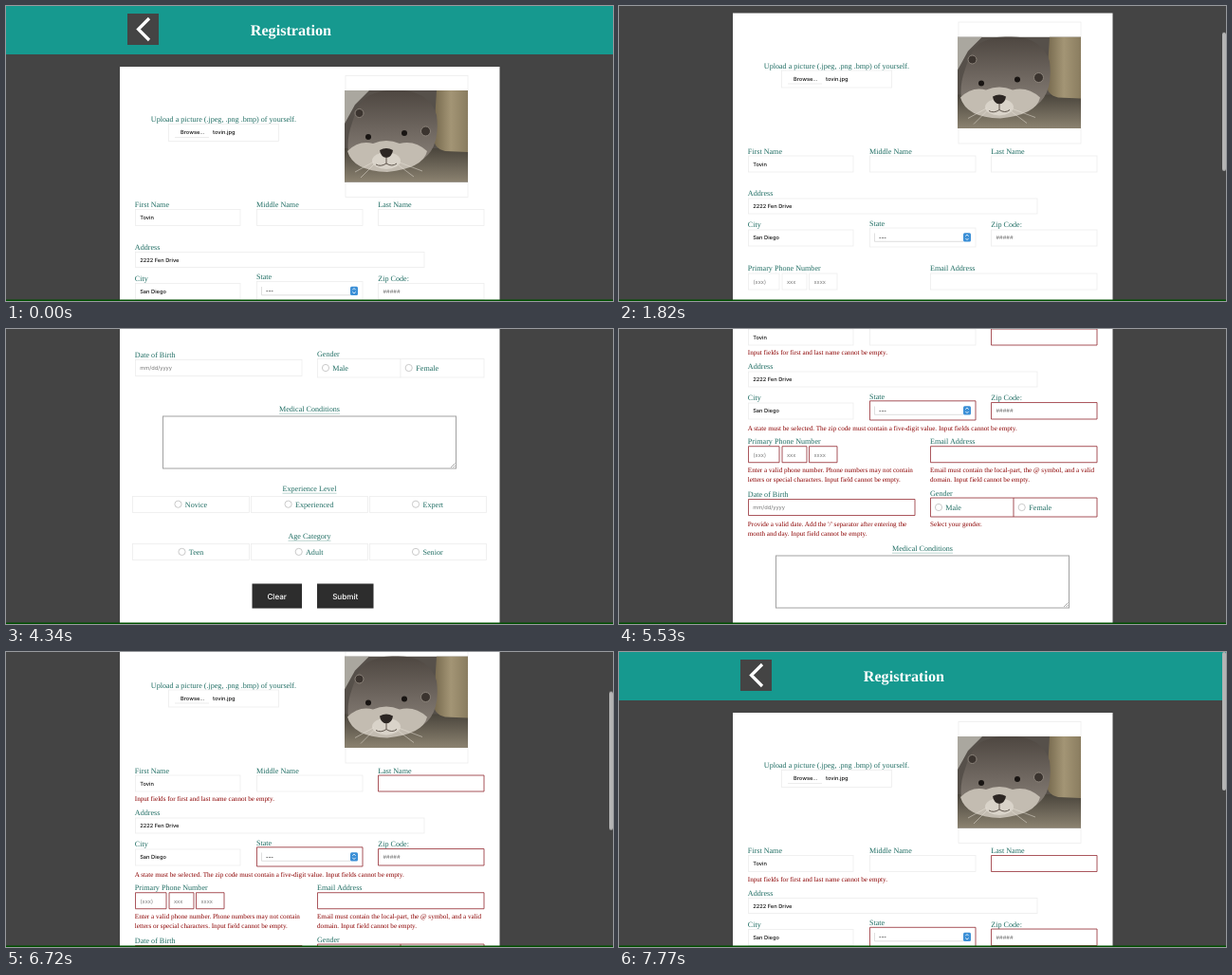
Recreate the animation shown at these times as an HTML page. Size 640 by 311 pixels, loop 7.91 s.

```html
<!DOCTYPE html>
<html lang="en">
<head>
<meta charset="utf-8">
<title>Registration form</title>
<style>
@property --scroll { syntax: "<number>"; inherits: true; initial-value: 0; }

html, body { margin: 0; width: 100%; height: 100%; overflow: hidden; background: #444; }

.stage {
  position: relative; width: 640px; height: 311px; overflow: hidden; background: #444;
  animation: scroll 7.91s infinite;
}
.page {
  position: absolute; left: 0; top: 0;
  transform: translateY(calc(var(--scroll) * -1px));
}
.thumb {
  position: absolute; left: 636px; top: 0; width: 3.5px; height: 145.5px;
  border-radius: 2px; background: #b4b4b4;
  transform: translateY(calc(var(--scroll) * .493px));
  animation: thumb 7.91s linear infinite;
}
.edge {
  position: absolute; left: 0; top: 310px; width: 640px; height: 1px;
  background: #005000; box-shadow: 0 -1px rgba(0, 80, 0, .5);
}

text { text-rendering: geometricPrecision; }
.title { font: bold 16.2px "Liberation Serif", Times, serif; fill: #fff; }
.label { font: 8.1px "Liberation Serif", Times, serif; fill: #1f6d63; }
.value, .hint { font: 500 5.7px Inter, "Liberation Sans", sans-serif; fill: #111; }
.hint { font-weight: 400; fill: #777; }
.button { font: 500 8.1px Inter, "Liberation Sans", sans-serif; fill: #fff; }
.mid { text-anchor: middle; }
.field { fill: #fff; stroke: #ededed; stroke-width: .8; }
.radio { fill: #fff; stroke: #bdbdbd; stroke-width: .8; }
.rule { stroke: #9fc2bc; stroke-width: .7; }

.errors { font: 7.14px "Liberation Serif", Times, serif; fill: #8b0000; animation: errors 7.91s step-end infinite; }
.errors path { fill: none; stroke: #9a3038; stroke-width: .8; }

/* Steps of 70 ms, as in a screen recording */
@keyframes scroll {
  0%      { --scroll: 0;     animation-timing-function: step-end; }
  19.469% { --scroll: 0;     animation-timing-function: steps(2); }
  21.239% { --scroll: 16;    animation-timing-function: steps(2); }
  23.009% { --scroll: 56.5;  animation-timing-function: steps(2); }
  24.779% { --scroll: 140;   animation-timing-function: steps(2); }
  26.549% { --scroll: 255;   animation-timing-function: steps(2); }
  28.319% { --scroll: 335;   animation-timing-function: steps(2); }
  30.088% { --scroll: 361.5; animation-timing-function: step-end; }
  60.177% { --scroll: 214.5; animation-timing-function: step-end; }
  78.761% { --scroll: 214.5; animation-timing-function: steps(2); }
  80.531% { --scroll: 195;   animation-timing-function: steps(5); }
  84.956% { --scroll: 84.5;  animation-timing-function: steps(3); }
  87.611% { --scroll: 25;    animation-timing-function: steps(2); }
  89.381%, 100% { --scroll: 0; }
}
@keyframes thumb {
  0%, 20.35% { opacity: 0; }
  20.354%, 39.8% { opacity: 1; }
  41.59%, 50.44% { opacity: 0; }
  50.445%, 52.2% { opacity: 1; }
  54.86%, 60.17% { opacity: 0; }
  60.177%, 67.2% { opacity: 1; }
  69.9%, 79.64% { opacity: 0; }
  79.646%, 100% { opacity: 1; }
}
@keyframes errors {
  0% { opacity: 0; }
  60.177%, 100% { opacity: 1; }
}
</style>
</head>
<body>
<div class="stage">
<svg class="page" width="640" height="740" viewBox="0 0 640 740">
  <defs>
    <linearGradient id="floor" x2="0" y2="1">
      <stop offset="0" stop-color="#4a453c"/><stop offset="1" stop-color="#8c8371"/>
    </linearGradient>
    <linearGradient id="fur" x2="0" y2="1">
      <stop offset="0" stop-color="#4d4640"/><stop offset=".5" stop-color="#6f6760"/>
      <stop offset="1" stop-color="#8f877e"/>
    </linearGradient>
    <linearGradient id="sack">
      <stop offset="0" stop-color="#75684d"/><stop offset=".5" stop-color="#a39575"/>
      <stop offset="1" stop-color="#8a7d60"/>
    </linearGradient>
    <clipPath id="crop"><rect x="357" y="89" width="130" height="96.5"/></clipPath>
  </defs>

  <rect width="640" height="51" fill="#16998f"/>
  <rect x="128" y="8" width="33" height="33" fill="#444"/>
  <path d="M151 13 139.5 24.5 151 36" fill="none" stroke="#fff" stroke-width="3.2"/>
  <text class="title" x="257.7" y="31">Registration</text>

  <rect x="120" y="64" width="400.5" height="680" fill="#fff"/>

  <!-- Picture upload -->
  <text class="label" x="152.8" y="122">Upload a picture (.jpeg, .png .bmp) of yourself.</text>
  <rect class="field" x="171.5" y="124.5" width="116" height="18"/>
  <path d="M178 138.5h36" stroke="#e4e4e4" stroke-width=".7"/>
  <text class="value" x="184" y="135.2">Browse...</text>
  <text class="value" x="218" y="135.2">tovin.jpg</text>
  <rect class="field" x="358" y="73.5" width="129" height="128"/>

  <g clip-path="url(#crop)">
    <rect x="357" y="89" width="130" height="97" fill="#56504a"/>
    <path d="M357 89h26l-15 15-11 20z" fill="#aaa79f"/>
    <path d="M357 150h130v36H357z" fill="url(#floor)"/>
    <path d="M454 89h33v65l-24-1q-13-3-12-16z" fill="url(#sack)"/>
    <path d="M380 96q20-11 46-6 22 5 28 25 3 24-6 38-12 17-45 21-34 0-42-19-2-16 4-32 5-18 15-27z" fill="url(#fur)"/>
    <path d="M360 153q12-12 27-8 14-6 28 0 16-4 29 8-4 18-42 22-36-1-42-22z" fill="#c3bcb1"/>
    <ellipse cx="401" cy="163" rx="15" ry="9" fill="#d9d3c9"/>
    <g fill="#3b342f" stroke="#8c847b">
      <circle cx="372.5" cy="113" r="4.5"/><circle cx="442.5" cy="132" r="5"/>
    </g>
    <path d="M394 152q7-4 14 0-1 7-7 8-6-1-7-8z" fill="#2c2623"/>
    <path d="M401 160v6q-6 4-11 1m11-1q6 4 11 0" fill="none" stroke="#5d534b"/>
    <g fill="#181412"><circle cx="382" cy="138" r="3"/><circle cx="420" cy="134" r="3"/></g>
    <path d="M388 164 368 175m20-8-14 14m41-16 24 9m-25-6 16 12" fill="none" stroke="#e8e2d8" stroke-width=".5"/>
  </g>

  <!-- Name and address -->
  <text class="label" x="135.8" y="212">First Name</text>
  <text class="label" x="264" y="212">Middle Name</text>
  <text class="label" x="392.3" y="212">Last Name</text>
  <rect class="field" x="136.5" y="214.5" width="110.5" height="17"/>
  <rect class="field" x="264.5" y="214.5" width="111.5" height="17"/>
  <rect class="field" x="392.5" y="214.5" width="111.5" height="17"/>
  <text class="value" x="141.2" y="225.2">Tovin</text>

  <text class="label" x="135.8" y="256.7">Address</text>
  <rect class="field" x="136.5" y="259.5" width="304.5" height="16"/>
  <text class="value" x="141.2" y="269.5">2222 Fen Drive</text>

  <text class="label" x="135.8" y="289.7">City</text>
  <text class="label" x="264" y="288">State</text>
  <text class="label" x="392.3" y="289.7">Zip Code:</text>
  <rect class="field" x="136.5" y="292.5" width="110.5" height="17"/>
  <rect class="field" x="264.5" y="290.5" width="111.5" height="20"/>
  <rect class="field" x="392.5" y="292.5" width="111.5" height="17"/>
  <text class="value" x="141.2" y="302.8">San Diego</text>
  <path d="M269.5 296v8.8H363" fill="none" stroke="#d2d2d2" stroke-width=".7"/>
  <rect x="363" y="295.7" width="8" height="9.3" rx="1.5" fill="#3b8fd6"/>
  <path d="M365.3 299.3 367 297.5l1.7 1.8m-3.4 2L367 303.1l1.7-1.8" fill="none" stroke="#fff" stroke-width=".8"/>
  <text class="value" x="274" y="302.3">---</text>
  <text class="hint" x="397.5" y="302.8">#####</text>

  <!-- Contact -->
  <text class="label" x="135.8" y="335.3">Primary Phone Number</text>
  <text class="label" x="328" y="335.3">Email Address</text>
  <rect class="field" x="136.5" y="338.5" width="32.5" height="17"/>
  <rect class="field" x="172" y="338.5" width="26" height="17"/>
  <rect class="field" x="200.5" y="338.5" width="29.5" height="17"/>
  <rect class="field" x="328.5" y="338.5" width="175.5" height="17"/>
  <text class="hint" x="141.5" y="349">(xxx)</text>
  <text class="hint" x="177" y="349">xxx</text>
  <text class="hint" x="205.5" y="349">xxxx</text>

  <text class="label" x="135.8" y="391.5">Date of Birth</text>
  <text class="label" x="328" y="390.3">Gender</text>
  <rect class="field" x="136.5" y="394" width="175.5" height="17"/>
  <rect class="field" x="328.5" y="393" width="87.5" height="19.5"/>
  <rect class="field" x="416" y="393" width="88" height="19.5"/>
  <text class="hint" x="141.2" y="404.6">mm/dd/yyyy</text>
  <circle class="radio" cx="337" cy="402.5" r="3.6"/><text class="label" x="344.3" y="405.2">Male</text>
  <circle class="radio" cx="424.7" cy="402.5" r="3.6"/><text class="label" x="432.3" y="405.2">Female</text>

  <!-- Medical -->
  <text class="label mid" x="320" y="448.3">Medical Conditions</text>
  <path class="rule" d="M288 450.7h64"/>
  <rect x="165.5" y="453.5" width="309" height="55" fill="#fff" stroke="#a2a2a2"/>
  <path d="M469 507.5l4.5-4.5m-2 4.5 2-2" stroke="#888" stroke-width=".7"/>

  <!-- Level and age -->
  <text class="label mid" x="320" y="532.3">Experience Level</text>
  <path class="rule" d="M291.5 534.7h57"/>
  <rect class="field" x="133.5" y="538" width="123" height="17"/>
  <rect class="field" x="258.5" y="538" width="123" height="17"/>
  <rect class="field" x="383.5" y="538" width="123" height="17"/>
  <circle class="radio" cx="181.5" cy="546.2" r="3.6"/><text class="label" x="188.8" y="549">Novice</text>
  <circle class="radio" cx="297.6" cy="546.2" r="3.6"/><text class="label" x="305" y="549">Experienced</text>
  <circle class="radio" cx="432" cy="546.2" r="3.6"/><text class="label" x="439.5" y="549">Expert</text>

  <text class="label mid" x="320" y="582.3">Age Category</text>
  <path class="rule" d="M297.5 584.7h45"/>
  <rect class="field" x="133.5" y="588" width="123" height="17"/>
  <rect class="field" x="258.5" y="588" width="123" height="17"/>
  <rect class="field" x="383.5" y="588" width="123" height="17"/>
  <circle class="radio" cx="185.5" cy="596.4" r="3.6"/><text class="label" x="192.8" y="599.2">Teen</text>
  <circle class="radio" cx="308.7" cy="596.4" r="3.6"/><text class="label" x="316" y="599.2">Adult</text>
  <circle class="radio" cx="432" cy="596.4" r="3.6"/><text class="label" x="439.5" y="599.2">Senior</text>

  <rect x="259.5" y="630" width="52.5" height="26" fill="#2d2d2d"/>
  <rect x="328" y="630" width="59.5" height="26" fill="#2d2d2d"/>
  <text class="button mid" x="285.7" y="646">Clear</text>
  <text class="button mid" x="357.7" y="646">Submit</text>

  <g class="errors">
    <path d="M392.5 214.5h111.5v17H392.5z M264.5 290.3H376V310.5H264.5z M392.5 292H504v17.5H392.5z
             M136.5 338.2H169v17H136.5z M172 338.2h26v17h-26z M200.5 338.2H230v17H200.5z
             M328.5 338.2H504v17H328.5z M136.5 394H312v17H136.5z M328.5 392.5H504v20H328.5z M416 392.5v20"/>
    <text x="135.8" y="241.5">Input fields for first and last name cannot be empty.</text>
    <text x="135.8" y="321">A state must be selected. The zip code must contain a five-digit value. Input fields cannot be empty.</text>
    <text x="135.8" y="365.2">Enter a valid phone number. Phone numbers may not contain</text>
    <text x="135.8" y="375.2">letters or special characters. Input field cannot be empty.</text>
    <text x="328" y="365.2">Email must contain the local-part, the @ symbol, and a valid</text>
    <text x="328" y="375.2">domain. Input field cannot be empty.</text>
    <text x="135.8" y="422">Provide a valid date. Add the '/' separator after entering the</text>
    <text x="135.8" y="432">month and day. Input field cannot be empty.</text>
    <text x="328" y="422">Select your gender.</text>
  </g>
</svg>
<div class="thumb"></div>
<div class="edge"></div>
</div>
</body>
</html>
```
